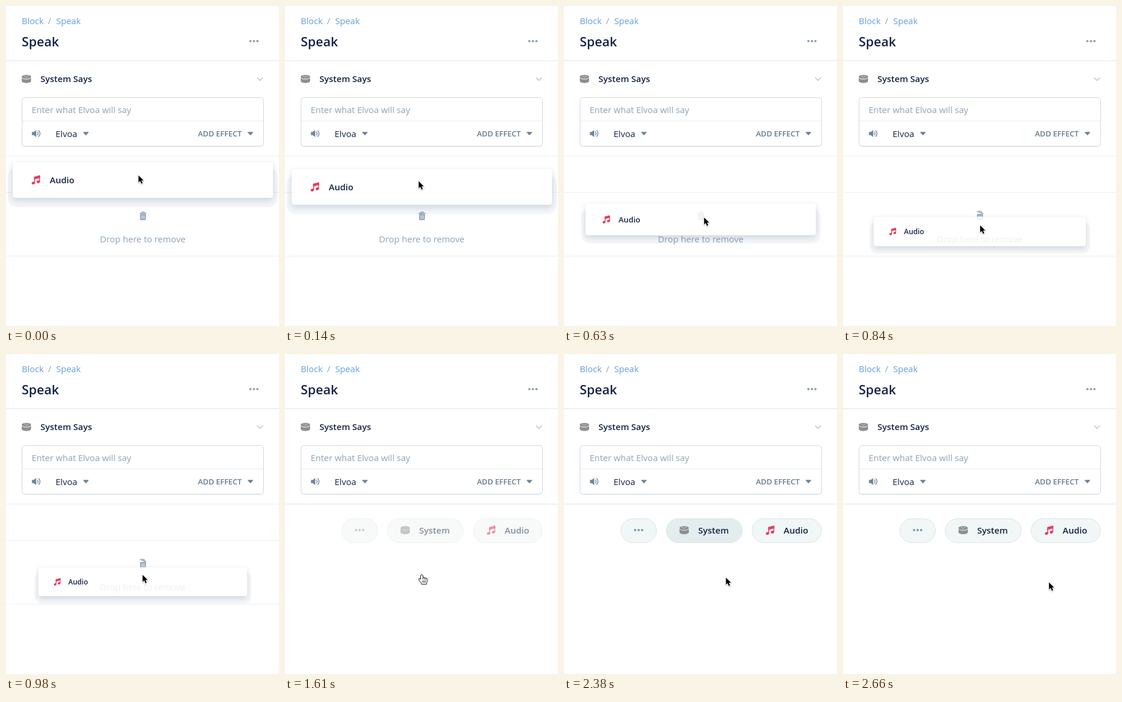
These frames come from a looping animation (468x547 px, 3.29 s). An HTML page with a canvas:

```html
<!DOCTYPE html>
<html lang="en">
<head>
<meta charset="utf-8">
<title>Speak block</title>
<style>
html, body { margin: 0; width: 100%; height: 100%; overflow: hidden; background: #fff; }
canvas { display: block; }
</style>
</head>
<body>
<canvas id="stage" width="468" height="547"></canvas>
<script>
const ctx = document.getElementById('stage').getContext('2d');
const LOOP = 3290, TICK = 70;
const INK = '#132144', MUTED = '#8da2b5', SLATE = '#6e849a', RED = '#e13d5b', GREY = '#8d8f91';

// Key rows: time, values...
const CARD = [[0, 297, 1], [140, 309, 1], [420, 323, 1], [560, 323.5, 1]];
const CARD_DROP = [[630, 364.5, .884], [980, 389.2, .801]];
const POINTER = [[0, 227, 289], [140, 229, 299], [420, 235, 324], [560, 239, 348], [630, 240, 361]];
const POINTER_DROP = [[630, 240, 361], [980, 234, 377]];
const POINTER_LEAVE = [[2310, 235, 377], [2660, 353, 390]];

const linear = p => p;
const easeOut = p => 1 - (1 - p) ** 2;
const progress = (t, from, to) => Math.min(1, Math.max(0, (t - from) / (to - from)));

function track(keys, t, ease = linear) {
  let i = 0;
  while (i < keys.length - 2 && t >= keys[i + 1][0]) i++;
  const [a, b] = [keys[i], keys[i + 1]];
  const p = ease(progress(t, a[0], b[0]));
  return a.slice(1).map((v, k) => v + (b[k + 1] - v) * p);
}

function text(str, x, y, color, size = 15, weight = 400) {
  ctx.font = `${weight} ${size}px "Open Sans", sans-serif`;
  ctx.fillStyle = color;
  ctx.fillText(str, x, y);
}

function box(x, y, w, h, r, fill, stroke) {
  ctx.beginPath();
  ctx.roundRect(x, y, w, h, r);
  if (fill) { ctx.fillStyle = fill; ctx.fill(); }
  if (stroke) { ctx.strokeStyle = stroke; ctx.lineWidth = 1; ctx.stroke(); }
}

function rule(y, color, x = 0, w = 468) {
  ctx.fillStyle = color;
  ctx.fillRect(x, y, w, 1);
}

function at(x, y, draw, scale = 1, angle = 0) {
  ctx.save();
  ctx.translate(x, y);
  ctx.rotate(angle);
  ctx.scale(scale, scale);
  draw();
  ctx.restore();
}

function shape(d, fill, stroke, width = 1) {
  const path = new Path2D(d);
  if (stroke) {
    ctx.strokeStyle = stroke;
    ctx.lineWidth = width;
    ctx.lineJoin = ctx.lineCap = 'round';
    ctx.stroke(path);
  }
  if (fill) { ctx.fillStyle = fill; ctx.fill(path); }
}

function dots(x, y, color) {
  ctx.fillStyle = color;
  for (const dx of [-6, 0, 6]) {
    ctx.beginPath();
    ctx.arc(x + dx, y, 2, 0, 7);
    ctx.fill();
  }
}

function caret(x, y) {
  at(x, y, () => shape('M-4 -2.2H4L0 2.2Z', SLATE, SLATE, 1.3));
}

function speaker(x, y) {
  at(x, y, () => {
    shape('M-7 -2.5H-4.5L-.5 -5.5V5.5L-4.5 2.5H-7Z', SLATE, SLATE, .5);
    shape('M2 -2.6Q4 0 2 2.6M4.2 -5Q8.5 0 4.2 5', null, SLATE, 1.3);
  });
}

function device(x, y, gap = '#fff') {
  at(x, y, () => {
    shape('M-8 -3.5C-8 -8 8 -8 8 -3.5V3.5C8 8.2 -8 8.2 -8 3.5Z', GREY);
    shape('M-8 -2.4C-7 1.5 7 1.5 8 -2.4', null, gap, 1);
    shape('M-3.5 -4.6H-2M2 -4.6H3.5M-1 -2.8H1', null, '#d4d6d7', 1);
  });
}

function music(x, y) {
  at(x + .2, y + .3, () => {
    shape('M-2.8 -5.5L7.2 -8V-3.6L-2.8 -1Z', RED, RED, .6);
    shape('M-2.3 -4V5M6.7 -6V2.8', null, RED, 1.5);
    ctx.fillStyle = RED;
    for (const [cx, cy] of [[-4.5, 5.6], [4.4, 3.3]]) {
      ctx.beginPath();
      ctx.ellipse(cx, cy, 3, 2.4, -.3, 0, 7);
      ctx.fill();
    }
  }, .96);
}

function trash(x, y, open) {
  at(x, y, () => {
    shape('M-4.5 -3H4.5L4 6.5H-4Z', MUTED, MUTED, 1);
    shape('M-2.2 -1V4.8M0 -1V4.8M2.2 -1V4.8', null, '#fff', .9);
    at(0, -4.8 - open * 1.2, () => {
      shape('M-5.3 0H5.3', null, MUTED, 1.5);
      shape('M-2 -.5V-2H2V-.5', null, MUTED, 1.2);
    }, 1, open * .35);
  });
}

function arrow(x, y) {
  at(x - .3, y, () => {
    const d = 'M.5 .5V13L3.4 10.4L5.6 15.4L7.8 14.4L5.7 9.6H9.6Z';
    ctx.shadowColor = 'rgba(0,0,0,.3)';
    ctx.shadowBlur = 2;
    ctx.shadowOffsetY = 1;
    shape(d, null, '#fff', 2);
    ctx.shadowColor = 'transparent';
    shape(d, '#000');
  }, .96);
}

function hand(x, y) {
  at(x, y, () => {
    shape('M4 9V2.2C4 .2 7 .2 7 2.2V6C7.5 4.8 9.5 5 9.7 6.4C10.4 5.4 12 5.8 12.2 7' +
      'C13 6.3 14.4 7 14.4 8.3V11C14.4 13.2 13 13.5 13 16H5.5C5.2 13.6 3 12.6 1 9.2' +
      'C0 7.4 1.8 6.6 3 7.8Z', '#fff', '#111', 1.8);
    shape('M7 6V8M9.7 6.6V8.4M12.2 7.2V8.8M7 10.5V13.5M9.2 10.5V13.5M11.4 10.5V13.5', null, '#111', .9);
  });
}

function header(lower) {
  text('Block', 27, 31, '#639fdc');
  text('/', 72, 31, MUTED);
  text('Speak', 86, 31, '#639fdc');
  text('Speak', 27, 69, INK, 22, 600);
  dots(425, 60, MUTED);
  rule(93, '#dfe3e8');

  device(35, 124.6);
  text('System Says', 59, 130, INK, 15, 600);
  at(435.5, 125, () => shape('M-4.6 -2.3L0 2.3L4.6 -2.3', null, '#b4c2d3', 1.4));

  box(27.5, 157.5, 414, 83, 5, null, '#eef1f4');
  box(27.5, 156.5, 414, 83, 5, '#fff', '#d0d7de');
  rule(196, '#e7ebef', 28, 413);
  text('Enter what Elvoa will say', 44, 183, MUTED);
  speaker(52, 218);
  text('Elvoa', 85, 224, INK);
  caret(137, 218);
  text('ADD EFFECT', 329, 223, '#64798e', 13, 600);
  caret(419, 218);
  rule(256, lower);
}

function dropZone(open) {
  rule(318, '#eaeef1');
  rule(427, '#eaeef1');
  trash(235, 359, open);
  text('Drop here to remove', 161, 404, MUTED, 15.1);
}

function card(cy, scale) {
  at(234.5, cy, () => {
    ctx.save();
    const outside = new Path2D();
    outside.rect(-300, -120, 600, 240);
    outside.roundRect(-223.5, -31, 447, 62, 5);
    ctx.clip(outside, 'evenodd');
    box(-231.5, -21, 463, 68, 16, 'rgba(17,49,96,.04)');
    ctx.shadowColor = 'rgba(17,49,96,.16)';
    ctx.shadowBlur = 12 * scale;
    ctx.shadowOffsetY = 5 * scale;
    box(-223.5, -31, 447, 62, 5, '#fff');
    ctx.restore();
    box(-223.5, -31, 447, 62, 5, 'rgba(255,255,255,.83)', 'rgba(17,49,96,.05)');
    music(-183.5, 0);
    text('Audio', -159.5, 6, INK, 15, 600);
  }, scale);
}

function buttons(hover) {
  const mix = (a, b) => Math.round(a + (b - a) * hover);
  const active = `rgb(${mix(241, 223)},${mix(246, 235)},${mix(246, 236)})`;
  const pill = (x, w, fill) => box(x + .5, 281.5, w - 1, 41, 20.5, fill, '#dce5e7');
  pill(97, 62, '#f1f6f6');
  dots(128, 301, '#8497ad');
  pill(175, 131, active);
  device(206, 301, active);
  text('System', 230, 307, INK, 15, 600);
  pill(322, 120, '#f1f6f6');
  music(353, 301);
  text('Audio', 376.5, 307, INK, 15, 600);
}

function draw(t) {
  ctx.fillStyle = '#fff';
  ctx.fillRect(0, 0, 468, 547);

  const dragging = t < 1610, over = t >= 630;
  header(dragging ? '#eaeef1' : '#dfe4e9');

  if (dragging) {
    dropZone(progress(t, 630, 840));
    card(...(over ? track(CARD_DROP, t, easeOut) : track(CARD, t)));
    arrow(...(over ? track(POINTER_DROP, t, easeOut) : track(POINTER, t)));
    return;
  }

  ctx.globalAlpha = t < 1680 ? .5 : 1;
  buttons(t < 1890 ? 0 : 1 - progress(t, 2310, 2660));
  ctx.globalAlpha = 1;
  if (t < 2380) hand(229, 377);
  else arrow(...track(POINTER_LEAVE, t, easeOut));
}

function loop() {
  const t = performance.now() % LOOP;
  draw(Math.floor(t / TICK) * TICK);
  requestAnimationFrame(loop);
}
loop();
</script>
</body>
</html>
```
